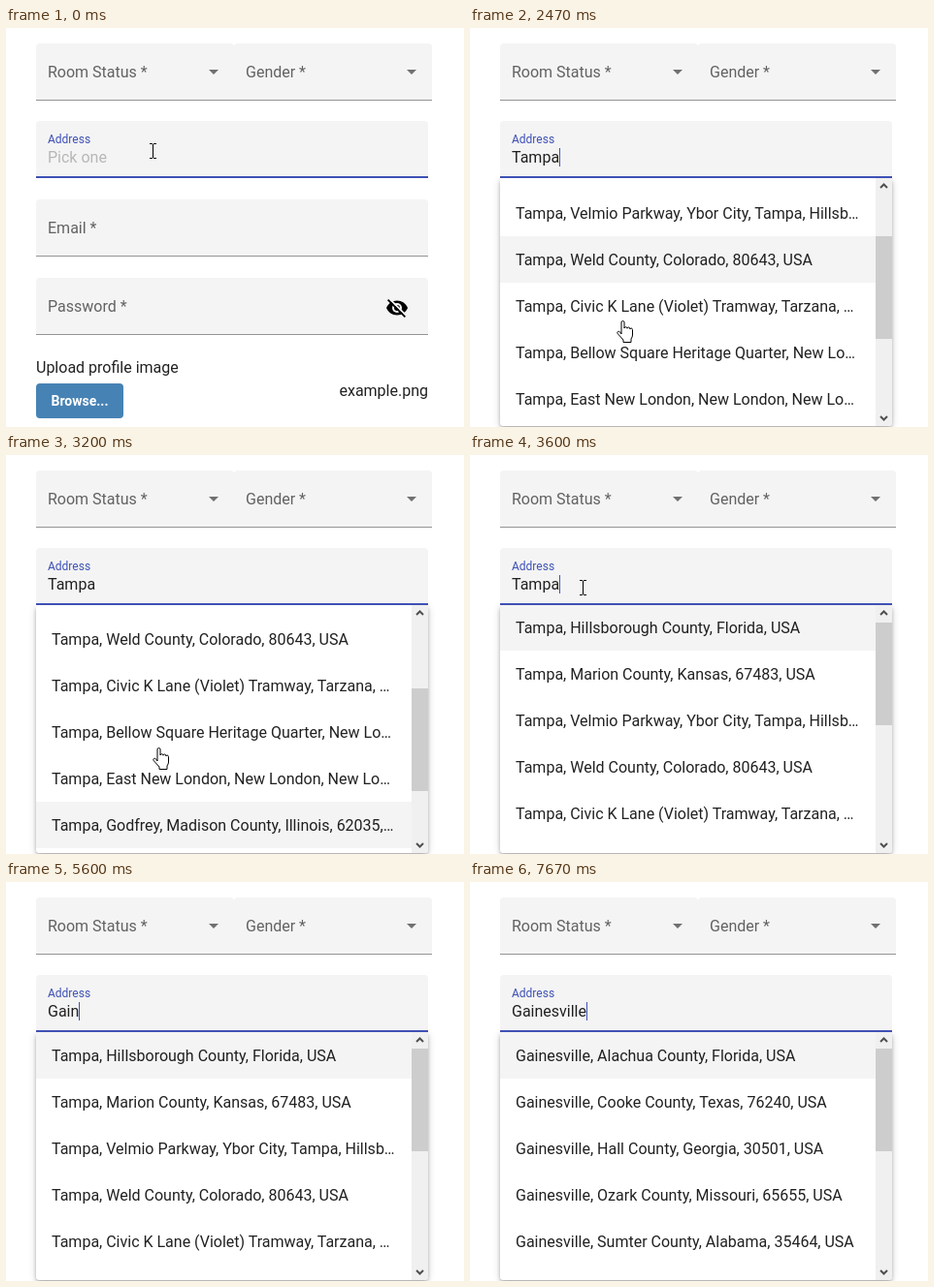
Recreate the animation shown at these times as an HTML page. Size 472 by 412 pixels, loop 8 s.

```html
<!DOCTYPE html>
<html lang="en">
<head>
<meta charset="utf-8">
<title>Address autocomplete</title>
<style>
html, body { margin: 0; width: 100%; height: 100%; overflow: hidden; background: #fff; }
body { position: relative; font: 16px/19px Roboto, sans-serif; color: rgba(0,0,0,.87); }
div, svg { position: absolute; box-sizing: border-box; white-space: pre; }
.field { left: 31px; width: 404px; height: 59px; padding: 20px 12px; background: #f4f4f4;
  border-bottom: 1px solid #949494; border-radius: 4px 4px 0 0; color: rgba(0,0,0,.6); }
.half { top: 16px; width: 204px; }
.half::after { content: ""; position: absolute; right: 16px; top: 27px;
  border: 5px solid transparent; border-top-color: rgba(0,0,0,.54); border-bottom: 0; }
#address { top: 96px; border-bottom: 2px solid #3f51b5; }
#label { left: 43px; top: 108px; font-size: 12px; line-height: 14px; color: #3f51b5; }
#input { left: 43px; top: 124px; height: 19px; }
#input.empty::before { content: "Pick one"; color: rgba(0,0,0,.25); }
#text.selected { background: #0078d7; color: #fff; }
#caret { position: absolute; top: 0; width: 1px; height: 19px; background: #3f51b5; }
#browse { left: 31px; top: 367px; width: 90px; height: 36px; border-radius: 4px; background: #4682b4;
  color: #fff; font-size: 14px; font-weight: 700; line-height: 36px; text-align: center; }
#panel, #shadow { left: 31px; top: 155px; width: 404px; height: 256px; border-radius: 0 0 4px 4px; }
#panel { overflow: hidden; background: #fff; }
#shadow { clip-path: inset(0 -12px -12px);
  box-shadow: 0 2px 4px -1px rgba(0,0,0,.2), 0 4px 5px rgba(0,0,0,.14), 0 1px 10px rgba(0,0,0,.12); }
.list { left: 0; top: 0; width: 387px; }
.list p { margin: 0; height: 48px; padding: 0 16px; line-height: 50px; overflow: hidden; text-overflow: ellipsis; }
.list .on { background: #f4f4f4; }
#bar { right: 0; top: 0; width: 17px; height: 256px; background: #f0f0f0; }
#bar svg, #pointer { left: 0; top: 0; }
#thumb { left: 0; top: 17px; width: 17px; height: 106px; background: #cdcdcd; }
</style>
</head>
<body>
<div class="field half">Room Status *</div>
<div class="field half" style="left:235px">Gender *</div>
<div class="field" id="address"></div>
<div id="label">Address</div>
<div id="input"><span id="text"></span><span id="caret"></span></div>
<div class="field" style="top:177px">Email *</div>
<div class="field" style="top:258px">Password *</div>
<svg style="left:391px;top:277px" width="24" height="24">
  <path d="M1 12C2.7 7.6 7 4.5 12 4.5S21.3 7.6 23 12C21.3 16.4 17 19.5 12 19.5S2.7 16.4 1 12Z"/>
  <circle cx="12" cy="12" r="5" fill="#f4f4f4"/><circle cx="12" cy="12" r="3"/>
  <path d="M3 1.5 22 20.5" stroke="#f4f4f4" stroke-width="1.8"/>
  <path d="M2.6 3.6 20.4 21.4" stroke="#000" stroke-width="1.8"/>
</svg>
<div style="left:31px;top:341px">Upload profile image</div>
<div id="browse">Browse...</div>
<div style="right:calc(100% - 435px);top:365px">example.png</div>

<div id="shadow"></div>
<div id="panel">
  <div class="list" id="tampa"></div>
  <div class="list" id="gaines"></div>
  <div id="bar">
    <div id="thumb"></div>
    <svg width="17" height="256" fill="none" stroke="#505050" stroke-width="2"><path d="M5 10 8.5 6.5 12 10M5 246 8.5 249.5 12 246"/></svg>
  </div>
</div>

<svg id="pointer" width="472" height="412">
  <path id="beam" d="M-3.5-7.5h3M.5-7.5h3M0-7V7M-3.5 7.5h3M.5 7.5h3" stroke="#000" shape-rendering="crispEdges"/>
  <path id="hand" fill="#fff" stroke="#000" stroke-linejoin="round" d="M-1 14V2q0-1.5 1.5-1.5T2 2v6q.2-1.3 1.5-1.3T5 8.2q.2-1.2 1.5-1.2T8 9q.2-1 1.2-1T10.5 9.5V15q0 2-1.5 4v3.5H1V20L-4.8 13.6q-.9-1.2 .2-2t2.2.3Z"/>
</svg>

<script>
const $ = id => document.getElementById(id);
const LOOP = 8000, TICK = 200 / 3, BLINK = 1600 / 3;
const ROW = 48, PANEL_TOP = 155;

const fill = (id, rows) => $(id).innerHTML = rows.map(r => `<p>${r}</p>`).join('');
fill('tampa', [
  'Tampa, Hillsborough County, Florida, USA',
  'Tampa, Marion County, Kansas, 67483, USA',
  'Tampa, Velmio Parkway, Ybor City, Tampa, Hillsborough County, Florida, USA',
  'Tampa, Weld County, Colorado, 80643, USA',
  'Tampa, Civic K Lane (Violet) Tramway, Tarzana, Los Angeles, California, USA',
  'Tampa, Bellow Square Heritage Quarter, New London, Connecticut, USA',
  'Tampa, East New London, New London, New London County, Connecticut, USA',
  'Tampa, Godfrey, Madison County, Illinois, 62035, USA',
  'Tampa, Pioneer, Hendry County, Florida, 33440, USA',
  'The Eastmere Royal, A Pennant Selection Hotel, Tampa, Florida, USA'
]);
fill('gaines', [
  'Gainesville, Alachua County, Florida, USA',
  'Gainesville, Cooke County, Texas, 76240, USA',
  'Gainesville, Hall County, Georgia, 30501, USA',
  'Gainesville, Ozark County, Missouri, 65655, USA',
  'Gainesville, Sumter County, Alabama, 35464, USA'
]);

// typing bursts: letters, start, time per key
const first = [['T', 130, 0], ['ampa', 400, 90]];
const second = [['Gain', 5070, 178], ['es', 5930, 200], ['vi', 6400, 200], ['lle', 6800, 130]];
const typed = (bursts, t) => bursts.map(([letters, start, gap]) =>
  [...letters].filter((_, i) => t >= start + i * gap).join('')).join('');

// eased moves: start, duration, then distances
const wheel = [[2333, 267, 112], [2667, 300, 112], [3070, 570, -224]];
const moves = [[1733, 67, 4, 36], [1800, 470, 2, 140], [3400, 200, -41, -166], [3600, 67, 7, -12], [3867, 133, -4, 15]];
const ease = p => 1 - (1 - Math.min(1, Math.max(0, p))) ** 2;
const glide = (list, t, c = 2) => list.reduce((sum, m) => sum + m[c] * ease((t - m[0]) / m[1]), 0);

const show = (id, on) => $(id).style.display = on ? '' : 'none';
const place = (id, x, y) => $(id).setAttribute('transform', `translate(${x} ${y})`);

function draw(now) {
  const time = Math.floor((now % LOOP + 5) / TICK) * TICK;
  const t = time + 5;

  const retyping = t >= 5070;
  const selected = t >= 4270 && !retyping;
  const text = typed(retyping ? second : first, t);
  $('text').textContent = text;
  $('text').className = selected ? 'selected' : '';
  $('input').className = text ? '' : 'empty';
  show('caret', t >= 200 && !selected && Math.floor((t - 200) / BLINK) % 2 === 0);

  const open = t >= 1330 && (t < 7530 || t >= 7600);
  show('panel', open);
  show('shadow', open);
  show('tampa', t < 7600);
  show('gaines', t >= 7600);
  const scroll = Math.round(glide(wheel, time));
  $('tampa').style.transform = `translateY(${-scroll}px)`;
  $('thumb').style.transform = `translateY(${Math.round(scroll * 115.5 / 224)}px)`;

  const x = 151 + Math.round(glide(moves, time)), y = 126 + Math.round(glide(moves, time, 3));
  const overList = y > PANEL_TOP && !retyping;
  show('hand', overList);
  show('beam', !overList && t < 4270);
  place('hand', x, y);
  place('beam', x + .5, y + .5);

  // the hovered row changes only once a scroll has nearly settled
  const settled = wheel.reduce((sum, [start, length, d]) => sum + (t > start + length * .85 ? d : 0), 0);
  const hover = overList ? Math.floor((y - PANEL_TOP + settled) / ROW) : 0;
  document.querySelectorAll('.list').forEach(list =>
    [...list.children].forEach((p, i) => p.className = i === hover ? 'on' : ''));

  requestAnimationFrame(draw);
}
requestAnimationFrame(draw);
</script>
</body>
</html>
```
